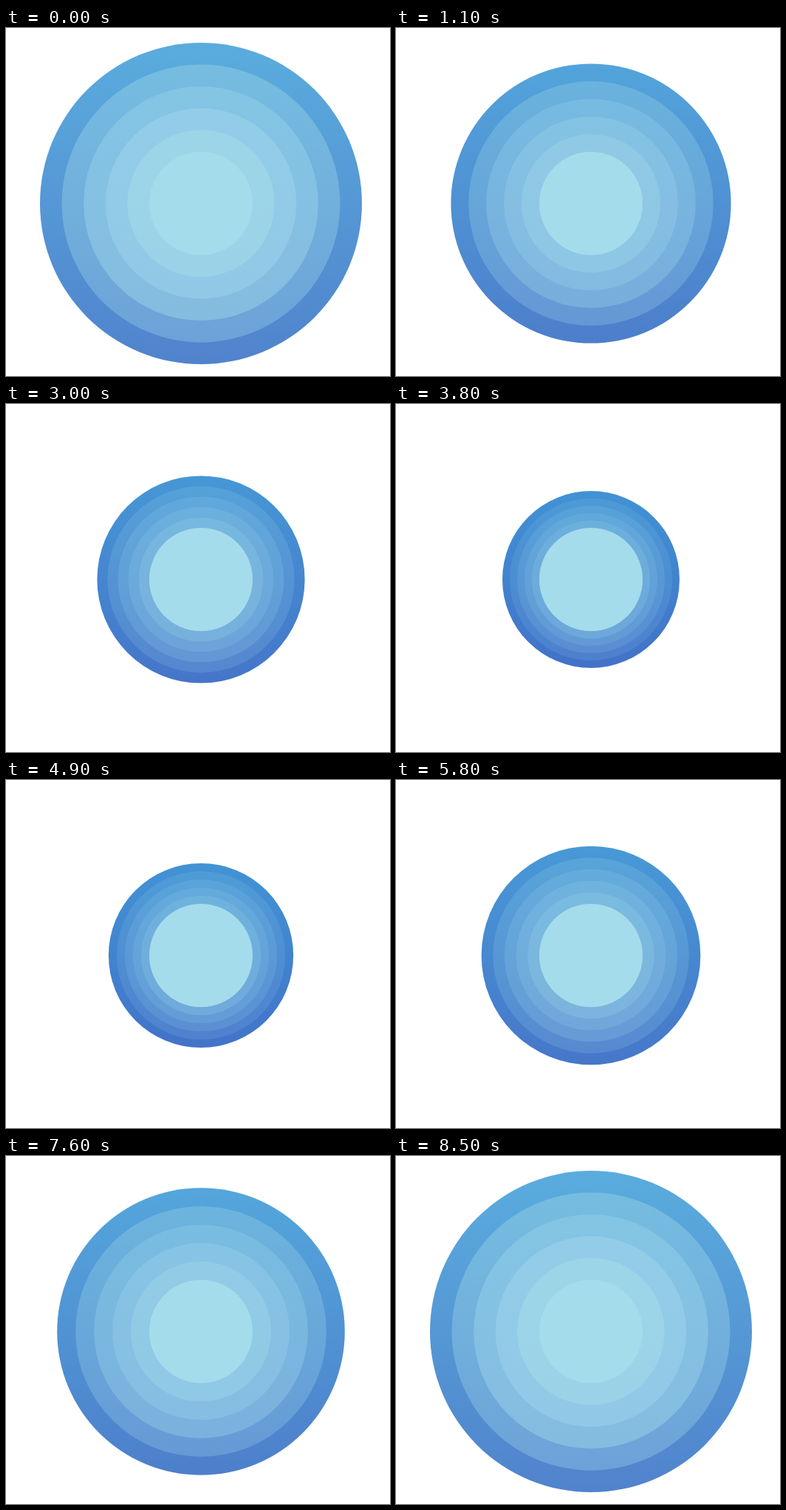
Write an HTML page with a canvas that moves like this. It is 520 px wide and 472 px high and loops after 8600 ms.

```html
<!DOCTYPE html>
<html lang="en">
<head>
<meta charset="utf-8">
<title>Breathing circles</title>
<style>
  html, body { margin: 0; width: 100%; height: 100%; overflow: hidden; background: #fff; }
  canvas { display: block; }
</style>
</head>
<body>
<canvas id="stage" width="520" height="472"></canvas>
<script>
const ctx = document.getElementById('stage').getContext('2d');
const STEP_MS = 100, STEPS = 86;
const CX = 264, CY = 238, CORE = 70, WIDE = 218, SHRINK = 2.58;

// Outermost ring first: top and bottom colours when wide, then when narrow.
const RINGS = [
  ['#5aacde', '#5083cc', '#3e8fd3', '#4070c8'],
  ['#76bde0', '#6ca2d8', '#4896d5', '#4a7ccc'],
  ['#84c5e4', '#84bce0', '#529ed8', '#5488d0'],
  ['#92cde8', '#91c8e6', '#5ca5da', '#5d94d4'],
  ['#9dd5e8', '#9bd2e8', '#66acdc', '#69a3d8']
].map(row => row.map(hex => [1, 3, 5].map(i => parseInt(hex.slice(i, i + 2), 16))));

const mix = (a, b, p) => `rgb(${a.map((v, i) => Math.round(v + (b[i] - v) * p)).join(',')})`;

function disc(radius, fill) {
  ctx.fillStyle = fill;
  ctx.beginPath();
  ctx.arc(CX, CY, radius, 0, Math.PI * 2);
  ctx.fill();
}

function draw(time) {
  const step = Math.floor(time / STEP_MS) % STEPS;
  const inward = Math.min(step, STEPS - 1 - step);
  const gap = (WIDE - SHRINK * inward - CORE) / RINGS.length;
  const p = inward / 42;

  ctx.fillStyle = '#fff';
  ctx.fillRect(0, 0, 520, 472);
  RINGS.forEach(([top, bottom, topEnd, bottomEnd], i) => {
    const radius = CORE + gap * (RINGS.length - i);
    const fill = ctx.createLinearGradient(0, CY - radius, 0, CY + radius);
    fill.addColorStop(0, mix(top, topEnd, p));
    fill.addColorStop(1, mix(bottom, bottomEnd, p));
    disc(radius, fill);
  });
  disc(CORE, '#a4dcec');
}

const start = performance.now();
function tick() {
  draw(performance.now() - start);
  requestAnimationFrame(tick);
}
tick();
</script>
</body>
</html>
```
